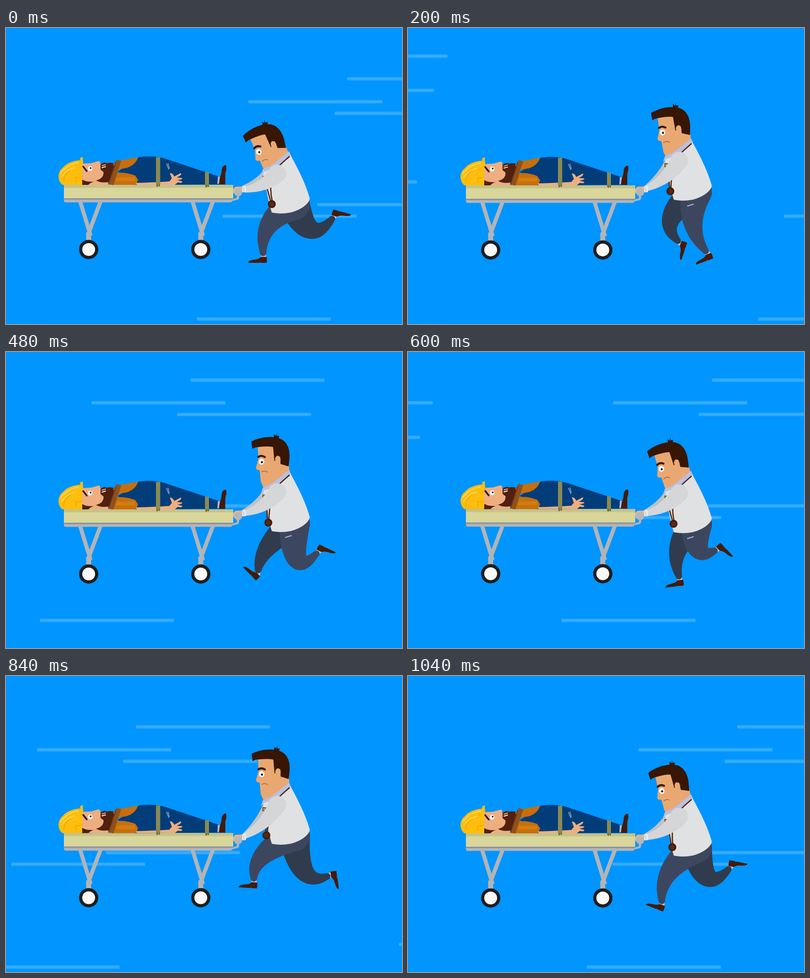
Recreate the animation shown at these times as an HTML page with a canvas. Size 800 by 600 pixels, loop 1.08 s.

```html
<!DOCTYPE html>
<html lang="en">
<head>
<meta charset="utf-8">
<title>Stretcher run</title>
<style>
html, body { margin: 0; width: 100%; height: 100%; overflow: hidden; background: #0095ff; }
canvas { display: block; }
</style>
</head>
<body>
<canvas id="stage" width="800" height="600"></canvas>
<script>
const ctx = document.getElementById('stage').getContext('2d');
const STEP = 40, LOOP = 1080, CYCLE = 25.3;
const SPEED = 80.55, WRAP = 2038;

// Speed lines: start x, y
const streaks = [
  [689, 103], [489, 149.5], [663, 173], [628, 358], [437, 381.5], [385, 590],
  [-514, 57], [-541, 126.5], [-714, 103], [-575, 312], [-766, 335.5], [-818, 544]
];

// Leg poses: phase, bend x/y and ankle x/y from the hip, foot angle
const legKeys = [
  [0, -71, 32, -63, 102, 0],
  [4, -23, 70, 21, 123, -.35],
  [4.35, -16, 78, 35, 111, -.75],
  [7, 9, 106, 70, 85, -1.5],
  [9.35, 6, 108, 68, 55, -2.95],
  [11, -10, 118, 47, 59, -2.69],
  [12.35, 14, 99, 67, 41, -2.95],
  [12.65, 29, 87, 78, 26, -2.87],
  [16.65, -83, 57, -35, 102, -1.25],
  [17, -108, 42, -60, 90, -1.25],
  [19.65, -83, 35, -79, 91, -.05],
  [22, -105, 44, -98, 86, .72],
  [23.65, -69, 47, -74, 99, .8],
  [25, -75, 44, -70, 112, .37],
  [25.3, -71, 32, -63, 102, 0]
];

// Body: step, lift, head tilt in degrees, pendant x
const bodyKeys = [
  [0, 0, -22, 537], [4, -26, -8, 530], [7, -34, 0, 521], [9, -32, 0, 525],
  [11, -11, -3.5, 530], [13, -1, -18, 537], [17, -32, -11, 535],
  [20, -34, -3, 526], [22, -32, 0, 527], [24, -13, -8, 532], [25, -10, -13.5, 534]
];

function pose(keys, t) {
  let i = 1;
  while (i < keys.length - 1 && keys[i][0] < t) i++;
  const a = keys[i - 1], b = keys[i], f = (t - a[0]) / (b[0] - a[0]);
  return a.slice(1).map((v, j) => v + (b[j + 1] - v) * f);
}

function fill(color, d) {
  ctx.fillStyle = color;
  ctx.fill(new Path2D(d));
}

function line(color, width, d, cap = 'butt') {
  ctx.strokeStyle = color;
  ctx.lineWidth = width;
  ctx.lineCap = cap;
  ctx.lineJoin = 'round';
  ctx.stroke(new Path2D(d));
}

function oval(color, x, y, rx, ry = rx) {
  ctx.fillStyle = color;
  ctx.beginPath();
  ctx.ellipse(x, y, rx, ry, 0, 0, 7);
  ctx.fill();
}

function box(color, x, y, w, h, r = 0) {
  ctx.fillStyle = color;
  ctx.beginPath();
  ctx.roundRect(x, y, w, h, r);
  ctx.fill();
}

// Tapered tube along a quadratic curve
function limb(color, [x0, y0], [x1, y1], [x2, y2], r0, r1) {
  ctx.fillStyle = color;
  ctx.beginPath();
  for (let i = 0; i <= 90; i++) {
    const s = i / 90, u = 1 - s, r = r0 + (r1 - r0) * s;
    const x = u * u * x0 + 2 * u * s * x1 + s * s * x2;
    const y = u * u * y0 + 2 * u * s * y1 + s * s * y2;
    ctx.moveTo(x + r, y);
    ctx.arc(x, y, r, 0, 7);
  }
  ctx.fill();
}

function leg(color, phase, hx, hy) {
  const [qx, qy, ax, ay, turn] = pose(legKeys, phase % CYCLE);
  const len = Math.hypot(ax - qx, ay - qy);
  const dx = (ax - qx) / len, dy = (ay - qy) / len;
  const x = hx + ax, y = hy + ay;
  line('#b7c1dd', 10, `M${x} ${y}L${x + dx * 8} ${y + dy * 8}`);
  ctx.save();
  ctx.translate(x + dx * 5, y + dy * 5);
  ctx.rotate(turn);
  fill('#451a08', 'M-5 -1L6 -1Q7 5 6 11L-5 11L-6 10L-9 11L-31 11C-31 6 -22 5 -15 4Q-9 3 -5 -1Z');
  ctx.restore();
  limb(color, [hx, hy], [hx + qx, hy + qy], [x - dx * 4, y - dy * 4], 31, 6.5);
  return qx;
}

function drawStreaks(k) {
  for (const [x0, y] of streaks) {
    const x = (x0 + SPEED * k + 900) % WRAP - 900;
    box('rgba(255,255,255,.1)', x, y - 4, 272, 8, 2);
    box('rgba(255,255,255,.12)', x + 1, y - 2.5, 270, 5, 1);
  }
}

function drawBed() {
  const steel = '#b3b4b6';
  line(steel, 8, 'M149 350L171 422M192 350L165 422M376 350L398 422M419 350L392 422');
  for (const x of [167, 393.5]) {
    box(steel, x - 5, 414, 10, 20, 3);
    oval('#1d1d1f', x, 450, 19.5);
    oval('#fafafa', x, 450, 13);
  }
  line(steel, 4, 'M440 351L456 350L468 347L469 334');
  box(steel, 117, 345, 340, 9.5, 4);
  box('#8b93a3', 117, 345, 342, 4, 2);
  box('#d9d69b', 117, 319, 342, 27);
  box('#c5c38a', 117, 319, 342, 6);
}

function drawPatient() {
  const skin = '#eeae7f', beard = '#51200f', orange = '#c66f0c';
  fill(beard, 'M152 309L178 309L172 319L152 319Z');
  fill(skin, 'M166 319Q176 309 200 310L212 319Z');
  fill(skin, 'M154 276L172 275L186 271Q191 270 190 276L198 277L200 305L180 312Q162 314 154 308Z');
  fill(beard, 'M191 277Q198 272 204 275Q212 273 219 276L218 304L208 313Q192 316 182 310Q198 306 197 293L191 288Z');
  line('#e9a46f', 2, 'M194 280L201 278', 'round');
  line('#f6e8d8', 2, 'M194 284L201 282', 'round');
  oval('#fff', 170, 286, 4.5, 5);
  oval('#1c1210', 171, 285, 1.8);
  line('#3d1a0d', 3.5, 'M156 282L163 291', 'round');

  // Helmet
  fill('#ffbd0d', 'M114 319C102 309 105 291 115 284C123 274 137 270 150 269L150 264L155 262L156 278L154 280L154 319Z');
  line('#ffd758', 2, 'M110 296Q125 276 147 274M112 303Q124 287 139 284');
  line('#eba800', 1.5, 'M117 313Q116 298 130 290M141 314L141 304L153 303');

  // Overalls and shirt
  fill('#033d79', 'M226 292L268 263C285 260 310 261 325 267L406 294L430 302L430 318L262 319Z');
  fill(orange, 'M216 278L224 271L267 263Q262 278 246 284L226 288Z');
  fill(orange, 'M208 319L222 295Q240 292 261 300L267 309L262 319Z');
  fill('#d47c10', 'M225 304L261 303L261 311L222 311Z');
  line('#91501a', 10, 'M228 269L212 318');
  line('#6c3815', 2, 'M222 272L207 318');
  line('#86a9cb', 1.5, 'M324 276L329 288M327 275L330 286');

  // Forearm and hand
  fill(skin, 'M262 315Q300 314 330 312L335 306L331 295Q336 294 340 302L353 295Q357 298 345 304L356 305Q358 308 346 309L356 312Q357 316 347 314L341 319L264 319Z');

  // Feet
  fill('#aeb9d8', 'M428 302L433 303L432 317L427 317Z');
  fill('#451a08', 'M430 318L432 304Q435 299 436 287Q438 279 444 279Q447 284 443 296L443 318Z');

  // Belts
  box('#8b8a52', 303, 263, 8.5, 56);
  box('#8b8a52', 402, 293, 8, 28);
  box('#67683e', 304, 318, 3, 5, 1);
  box('#67683e', 308, 318, 3, 4, 1);
  box('#67683e', 403, 319, 3, 5, 1);
  box('#67683e', 407, 319, 3, 4, 1);
}

function drawHead(lift, tilt) {
  const hair = '#381604', skin = '#e9a872';
  ctx.save();
  ctx.translate(572 + tilt * .3, 242 + lift);
  ctx.rotate(tilt * Math.PI / 180);
  ctx.translate(-572, -208);
  fill(skin, 'M512 163L512 190L506 207Q505 212 513 213L514 236L520 253L545 260L573 224L572 165Z');
  fill(hair, 'M501 169L500 154C515 147 535 145 550 149C570 153 577 170 575 190L572 209L556 203L556 188L548 188L548 196L544 196L543 168Q535 165 512 166Q505 166 501 169Z');
  fill(hair, 'M545 150L547 142L550 146L553 140L552 146L557 146L555 152Z');
  oval(skin, 551, 194, 5.5, 8);
  oval('#fff', 518, 196, 5.5, 6);
  oval('#1c1210', 518.5, 197, 2.2);
  line(hair, 4, 'M512 186Q518 182 525 187', 'round');
  line('#9b6239', 1.3, 'M517 217Q523 213 529 218', 'round');
  ctx.restore();
}

function drawRunner(k) {
  const [lift, tilt, px] = pose(bodyKeys, k);
  const hip = 358 + lift, wrist = [484, 325 + (lift + 20) * .12];
  limb('#bfc0c4', [535, 288 + lift], [517, 311 + lift * .55], [482, 323], 12, 5);
  leg('#303c4d', k + CYCLE / 2, 583, hip);
  drawHead(lift, tilt);
  const bend = leg('#3c475f', k, 583, hip);

  ctx.save();
  ctx.translate(0, lift);
  if (bend > -40) line('#aab4cc', 2, 'M564 387L577 383');
  fill('#e0e1e2', 'M519 290L574 256C590 285 605 315 613 343C617 351 600 368 575 374C560 377 545 376 537 374C530 350 526 330 519 290Z');
  fill('#b7c1e2', 'M515 298L519 286C535 282 555 263 572 250L575 257C562 272 545 283 533 288L522 291Z');
  box('#74552e', 518, 300, 13, 8);
  box('#d9a060', 520, 302, 3, 4);
  box('#c7c8c8', 525, 302, 4, 4);
  line('#552310', 2.5, `M573 260C560 272 543 284 537 302Q532 325 ${px + 1} 352M524 308Q528 330 ${px - 2} 352`);
  oval('#451a08', px, 357, 8);
  oval('#5b2813', px, 357, 5);
  ctx.restore();

  limb('#d5d6d8', [548, 295 + lift], [524, 322 + lift * .55], wrist, 18, 6);
  oval('#e9b488', 467, 330, 8.5);
  fill('#e9b488', 'M466 322L479 321L480 332L468 338Z');
  box('#e7e8eb', 477, 320, 8, 13, 2);
  line('#b5b9c2', 1, 'M479 323L481 332');
  oval('#b6b7b9', 469, 333, 8);
  line('#b3b4b6', 4, 'M469 335L469 346');
}

function draw(now) {
  const t = now % LOOP;
  const k = Math.max(0, Math.floor((t - STEP) / STEP));
  ctx.fillStyle = '#0095ff';
  ctx.fillRect(0, 0, 800, 600);
  drawStreaks(k);
  ctx.save();
  ctx.translate(0, -Math.max(0, Math.cos(k / 17 * 2 * Math.PI)));
  drawBed();
  drawPatient();
  ctx.restore();
  drawRunner(k);
}

const start = performance.now();
function tick() {
  draw(performance.now() - start);
  requestAnimationFrame(tick);
}
tick();
</script>
</body>
</html>
```
